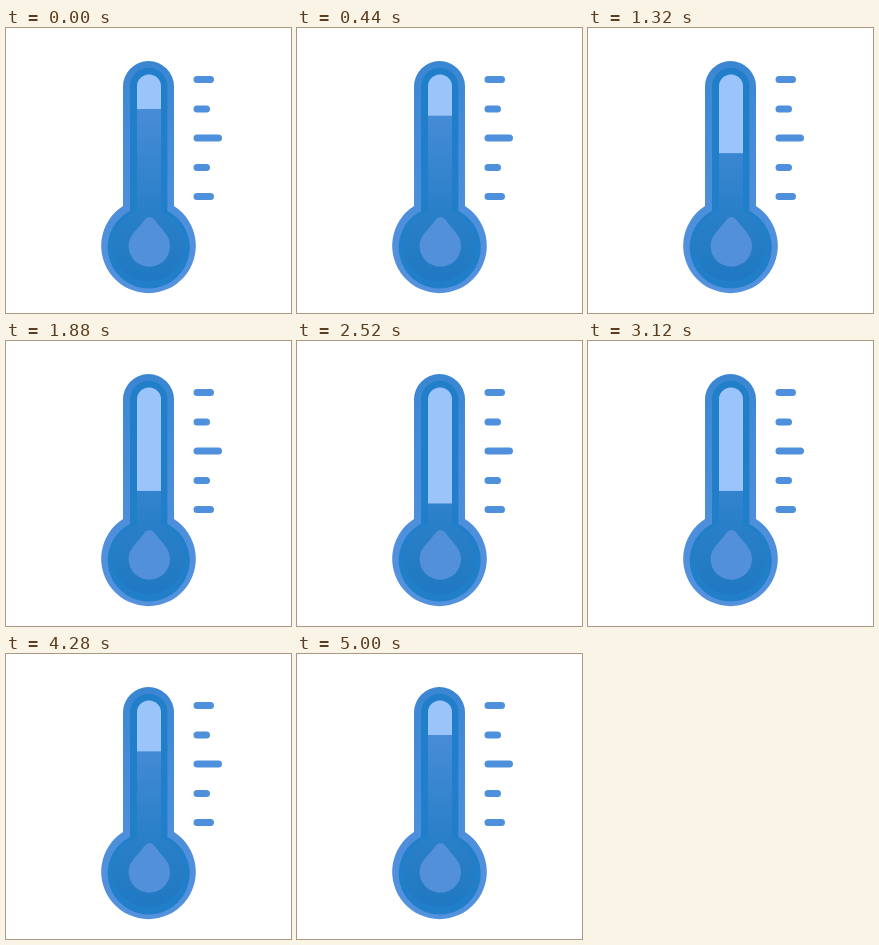
Recreate the animation shown at these times as an HTML page. Size 285 by 285 pixels, loop 5040 ms.

```html
<!DOCTYPE html>
<html lang="en">
<head>
<meta charset="utf-8">
<title>Thermometer</title>
<style>
  html, body { margin: 0; height: 100%; overflow: hidden; background: #fff; }
  svg { display: block; width: 100vw; height: 100vh; }
</style>
</head>
<body>
<svg viewBox="0 0 285 285">
  <defs>
    <linearGradient id="shell" gradientUnits="userSpaceOnUse" x1="0" y1="33" x2="0" y2="265">
      <stop offset="0" stop-color="#3a86d2"/>
      <stop offset=".35" stop-color="#478cd8"/>
      <stop offset="1" stop-color="#5492de"/>
    </linearGradient>
    <linearGradient id="liquid" gradientUnits="userSpaceOnUse" x1="0" y1="75" x2="0" y2="250">
      <stop offset="0" stop-color="#4a8dd8"/>
      <stop offset=".6" stop-color="#2a80c9"/>
      <stop offset="1" stop-color="#2079c2"/>
    </linearGradient>
    <clipPath id="bore">
      <path d="M131 190V58.5a12 12 0 0 1 24 0V190z"/>
    </clipPath>
  </defs>
  <path fill="url(#shell)" d="M117 178V58.5a25.5 25.5 0 0 1 51 0V178A47.3 47.3 0 1 1 117 178z"/>
  <path fill="#217fc9" d="M124 183V58.5a18.7 18.7 0 0 1 37.4 0V183A41 41 0 1 1 124 183z"/>
  <circle cx="142.5" cy="217.5" r="36" fill="url(#liquid)"/>
  <g clip-path="url(#bore)">
    <rect x="131" y="46" width="24" height="144" fill="url(#liquid)"/>
    <rect id="empty" x="131" y="46" width="24" height="35" fill="#9bc4fb"/>
  </g>
  <path fill="#5290da" d="M143.5 189Q147 189 151 195C157 203 164 208 164 218A20.7 20.7 0 0 1 122.6 218C122.6 208 130 203 136 195Q140 189 143.5 189z"/>
  <path fill="none" stroke="#4f90dc" stroke-width="7" stroke-linecap="round"
    d="M191 51.5h13.5M191 81h9.5M191 110h21.5M191 139.5h9.5M191 168.5h13.5"/>
</svg>
<script>
  const LOOP = 5040, HALF = 2500, STEP = 40;
  const TOP = 46, HIGH = 81, DROP = 81.5;
  const empty = document.getElementById('empty');
  const ease = x => x * x * (3 - 2 * x);

  function draw(now) {
    const t = Math.floor((now % LOOP) / STEP) * STEP;
    const fall = ease(1 - Math.abs(t - HALF) / HALF);
    empty.setAttribute('height', HIGH + DROP * fall - TOP);
    requestAnimationFrame(draw);
  }
  draw(performance.now());
</script>
</body>
</html>
```
